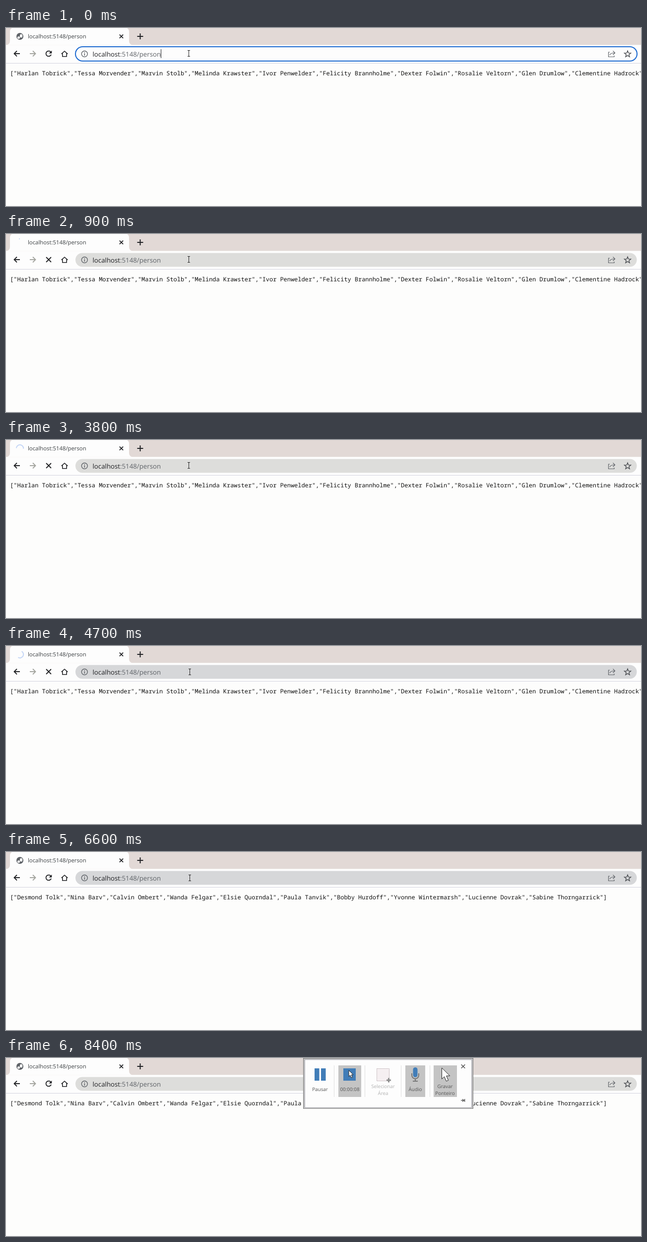
Recreate the animation shown at these times as an HTML page with a canvas. Size 1280 by 361 pixels, loop 8.5 s.

```html
<!DOCTYPE html>
<html lang="en">
<head>
<meta charset="utf-8">
<title>localhost:5148/person</title>
<style>
html, body { margin: 0; width: 100%; height: 100%; overflow: hidden; background: #fdfdfc; }
canvas { display: block; width: 1280px; height: 361px; }
</style>
</head>
<body>
<canvas id="stage"></canvas>
<script>
const W = 1280, H = 361, LOOP = 8500, STEP = 100;
const NAVIGATE = 850, RESPONSE = 5900, REVOLUTION = 1320;
const SANS = '"Open Sans", "Noto Sans", sans-serif';
const MONO = '"Noto Sans Mono", "DejaVu Sans Mono", monospace';
const DARK = '#202124', GREY = '#5f6368', LIGHT = '#fdfdfd', STRIP = '#e2d9d6';
const BLUE = '#417db8', BUTTON = '#c4c4c4', LABEL = '#555';

const before = ['Harlan Tobrick', 'Tessa Morvender', 'Marvin Stolb', 'Melinda Krawster',
  'Ivor Penwelder', 'Felicity Brannholme', 'Dexter Folwin', 'Rosalie Veltorn',
  'Glen Drumlow', 'Clementine Hadrock'];
const after = ['Desmond Tolk', 'Nina Barv', 'Calvin Ombert', 'Wanda Felgar',
  'Elsie Quorndal', 'Paula Tanvik', 'Bobby Hurdoff', 'Yvonne Wintermarsh',
  'Lucienne Dovrak', 'Sabine Thorngarrick'];

const canvas = document.getElementById('stage');
const ratio = window.devicePixelRatio || 1;
canvas.width = W * ratio;
canvas.height = H * ratio;
const g = canvas.getContext('2d');

function rect(x, y, w, h, color) {
  g.fillStyle = color;
  g.fillRect(x, y, w, h);
}

function pill(x, y, w, h, color) {
  g.beginPath();
  g.roundRect(x, y, w, h, Math.min(w, h) / 2);
  g.fillStyle = color;
  g.fill();
}

function stroke(color, width, build) {
  g.strokeStyle = color;
  g.lineWidth = width;
  g.beginPath();
  build();
  g.stroke();
}

function trace(...pts) {
  pts.forEach(([x, y], i) => i ? g.lineTo(x, y) : g.moveTo(x, y));
}

function cross(x, y, r, color, width) {
  stroke(color, width, () => {
    trace([x - r, y - r], [x + r, y + r]);
    trace([x - r, y + r], [x + r, y - r]);
  });
}

function plus(x, y, r, color, width) {
  rect(x - r, y - width / 2, 2 * r, width, color);
  rect(x - width / 2, y - r, width, 2 * r, color);
}

function text(str, x, y, size, color, family = SANS, align = 'left') {
  g.font = `${size}px ${family}`;
  g.textAlign = align;
  g.fillStyle = color;
  g.fillText(str, x, y);
  return g.measureText(str).width;
}

function label(x, color, ...rows) {
  const top = rows.length > 1 ? 61 : 67;
  rows.forEach((row, i) => text(row, x, top + i * 13.5, 9.9, color, SANS, 'center'));
}

function globe(x, y) {
  pill(x - 7, y - 7, 14, 14, GREY);
  pill(x - 5, y, 5, 5, LIGHT);
  pill(x, y - 4.5, 5, 7, LIGHT);
}

// The arc grows from twelve o'clock, then half a ring turns counter-clockwise.
function spinner(x, y, elapsed) {
  const turn = elapsed / REVOLUTION * Math.PI * 2;
  const top = -Math.PI / 2;
  stroke('#c3d5f6', 2, () => g.arc(x, y, 7.2, top - turn, top - Math.max(0, turn - Math.PI)));
}

function tabStrip(t, loading) {
  const left = 8, right = 248, base = 34.5, r = 8;
  rect(0, 0, W, base, STRIP);
  g.beginPath();
  g.moveTo(left - r, base);
  g.arcTo(left, base, left, base - r, r);
  g.arcTo(left, -1, left + r, -1, r);
  g.arcTo(right, -1, right, r, r);
  g.arcTo(right, base, right + r, base, r);
  g.lineTo(right + r, base);
  g.fillStyle = LIGHT;
  g.fill();
  if (loading) spinner(28, 17, t - NAVIGATE); else globe(28, 17);
  text('localhost:5148/person', 44, 21, 11.33, '#3c4043');
  cross(232.5, 17, 3.7, DARK, 1.7);
  plus(270.5, 17, 6, DARK, 2);
}

function arrow(x, y, dir, color) {
  const tip = x + 5.5 * dir;
  stroke(color, 1.8, () => {
    trace([x - 6 * dir, y], [tip, y]);
    trace([x, y - 5.5], [tip, y], [x, y + 5.5]);
  });
}

function reload(x, y) {
  stroke(DARK, 1.8, () => g.arc(x, y, 5.4, 0.35, -0.75));
  g.beginPath();
  trace([x + 6.3, y - 6.2], [x + 6.3, y - 0.4], [x + 0.5, y - 0.4]);
  g.fillStyle = DARK;
  g.fill();
}

function home(x, y) {
  stroke(DARK, 1.6, () => {
    trace([x - 6.3, y + 0.7], [x, y - 5], [x + 6.3, y + 0.7]);
    trace([x - 4.2, y - 0.5], [x - 4.2, y + 5.7], [x + 4.2, y + 5.7], [x + 4.2, y - 0.5]);
  });
}

function info(x, y) {
  stroke(GREY, 1.4, () => g.arc(x, y, 6, 0, Math.PI * 2));
  rect(x - 0.7, y - 1, 1.5, 4.5, GREY);
  rect(x - 0.7, y - 3.5, 1.5, 1.5, GREY);
}

function share(x, y) {
  stroke(GREY, 1.2, () => {
    trace([x - 4, y - 3], [x - 6.5, y - 3], [x - 6.5, y + 6.5], [x + 5, y + 6.5], [x + 5, y + 4]);
    g.moveTo(x - 4, y + 3);
    g.quadraticCurveTo(x - 3, y - 1.5, x + 6, y - 1.5);
    trace([x + 2.5, y - 5.5], [x + 6.5, y - 1.5], [x + 2.5, y + 2.5]);
  });
}

function star(x, y) {
  stroke('#4a4d51', 1.4, () => {
    for (let i = 0; i < 10; i++) {
      const r = i % 2 ? 2.9 : 6.8, a = i * Math.PI / 5;
      g.lineTo(x + r * Math.sin(a), y - r * Math.cos(a));
    }
    g.closePath();
  });
}

function toolbar(t, loading, hover) {
  const y = 52, focused = t < NAVIGATE;
  rect(0, 34.5, W, 36.5, LIGHT);
  rect(0, 71, W, 1, '#d3d3df');
  arrow(22, y, -1, DARK);
  arrow(54, y, 1, '#a3a49e');
  if (loading) cross(86, y, 5, DARK, 1.8); else reload(86, y);
  home(118, y);
  if (focused) {
    pill(139, 37, 1134, 31, '#1b69d0');
    pill(141, 39, 1130, 27, LIGHT);
  } else {
    pill(140, 38.5, 1131.5, 28, hover ? '#d6d7d9' : '#dddddb');
  }
  info(158.3, y + 0.5);
  const host = text('localhost', 174.5, 57.5, 13.25, DARK);
  text(':5148/person', 174.5 + host, 57.5, 13.25, GREY);
  if (focused && t < 500) rect(312, 43, 1, 18, DARK);
  share(1221, y);
  star(1253, y + 1);
}

function pointer(x, y, k) {
  g.save();
  g.translate(x, y);
  g.scale(k, k);
  stroke('#222', 1 / k, () => {
    trace([0, 0], [0, 12.5], [2.8, 9.9], [5, 15], [7.3, 14], [5.1, 9], [9, 9]);
    g.closePath();
    g.fillStyle = '#fff';
    g.fill();
  });
  g.restore();
}

function beam(x, y) {
  rect(x, y - 5, 1, 11, '#222');
  for (const end of [y - 6, y + 6]) rect(x - 2, end, 5, 1, '#222');
}

function ease(t, from, to) {
  const p = Math.min(1, Math.max(0, (t - from) / (to - from)));
  return p * p * (3 - 2 * p);
}

// A nudge in the address bar, up to the screen edge, then down to the stop button.
function pointerAt(t) {
  const nudge = ease(t, 4000, 4100), up = ease(t, 7300, 7700), down = ease(t, 7900, 8300);
  return [368 + 2 * nudge + 371 * up - 50 * down, 51 + nudge - 52 * up + 25 * down].map(Math.round);
}

function microphone(x, y) {
  pill(x - 4.5, y - 16, 9, 20, BLUE);
  stroke('#777', 2, () => {
    g.moveTo(x - 7, y - 4);
    g.arc(x, y, 7, Math.PI, 0, true);
    g.lineTo(x + 7, y - 4);
    trace([x, y + 7], [x, y + 12]);
    trace([x - 5, y + 12], [x + 5, y + 12]);
  });
}

function pin(x, y) {
  rect(x - 4, y - 0.7, 4, 1.4, '#666');
  rect(x - 1, y - 1.5, 5, 3, '#666');
  for (const dx of [-1, 3]) rect(x + dx, y - 3, 1.4, 6, '#666');
}

function recorder(offset, hoverStop) {
  const button = (x, w) => rect(x, 15, w, 64, BUTTON);
  g.save();
  g.translate(0, offset);
  ['#7f7f7f', '#d4d4d4', '#a9a9b0', LIGHT].forEach((color, i) =>
    rect(599 + i * 1.3, i * 1.3, 343 - i * 2.6, 103 - i * 1.3 - i, color));
  for (const x of [661, 723, 796, 854]) rect(x, 15, 1, 64, '#dedede');

  for (const x of [622, 635]) rect(x, 21, 9.5, 25, BLUE);
  label(633, LABEL, 'Pausar');

  if (hoverStop) button(670, 46);
  rect(680, 21, 25, 25, BLUE);
  label(693, LABEL, '00:00:08');

  rect(748, 22, 25, 24, '#f5eff1');
  g.setLineDash([2, 1]);
  stroke('#b9a9ae', 1, () => g.rect(747.5, 21.5, 25, 25));
  g.setLineDash([]);
  plus(771.5, 45, 4.5, '#8f8f8f', 3);
  label(760, '#b3b3b3', 'Selecionar', 'Área');

  button(805, 40);
  microphone(825, 35);
  label(825, LABEL, 'Áudio');

  button(862, 47);
  pointer(878.5, 20, 1.8);
  label(885, LABEL, 'Gravar', 'Ponteiro');

  cross(921.5, 17, 3.8, LABEL, 1.6);
  pin(921, 86);
  g.restore();
}

function draw(time) {
  const t = Math.floor(time % LOOP / STEP) * STEP;
  const loading = t >= NAVIGATE && t < RESPONSE;
  const [x, y] = pointerAt(t);
  const overBar = y >= 39 && y < 67;
  const inPanel = t >= 7800;

  g.setTransform(ratio, 0, 0, ratio, 0, 0);
  g.textRendering = 'geometricPrecision';
  rect(0, 0, W, H, '#fdfdfc');
  tabStrip(t, loading);
  toolbar(t, loading, overBar && t >= 4100);
  text(JSON.stringify(t < RESPONSE ? before : after), 8.1, 96, 11.94, '#111', MONO);

  if (inPanel) recorder(Math.min(0, (t - 8000) * 0.34), t >= 8200);
  if (overBar) beam(x, y); else pointer(x, y, 1);
}

const start = performance.now();
function tick() {
  draw(performance.now() - start);
  requestAnimationFrame(tick);
}
tick();
</script>
</body>
</html>
```
